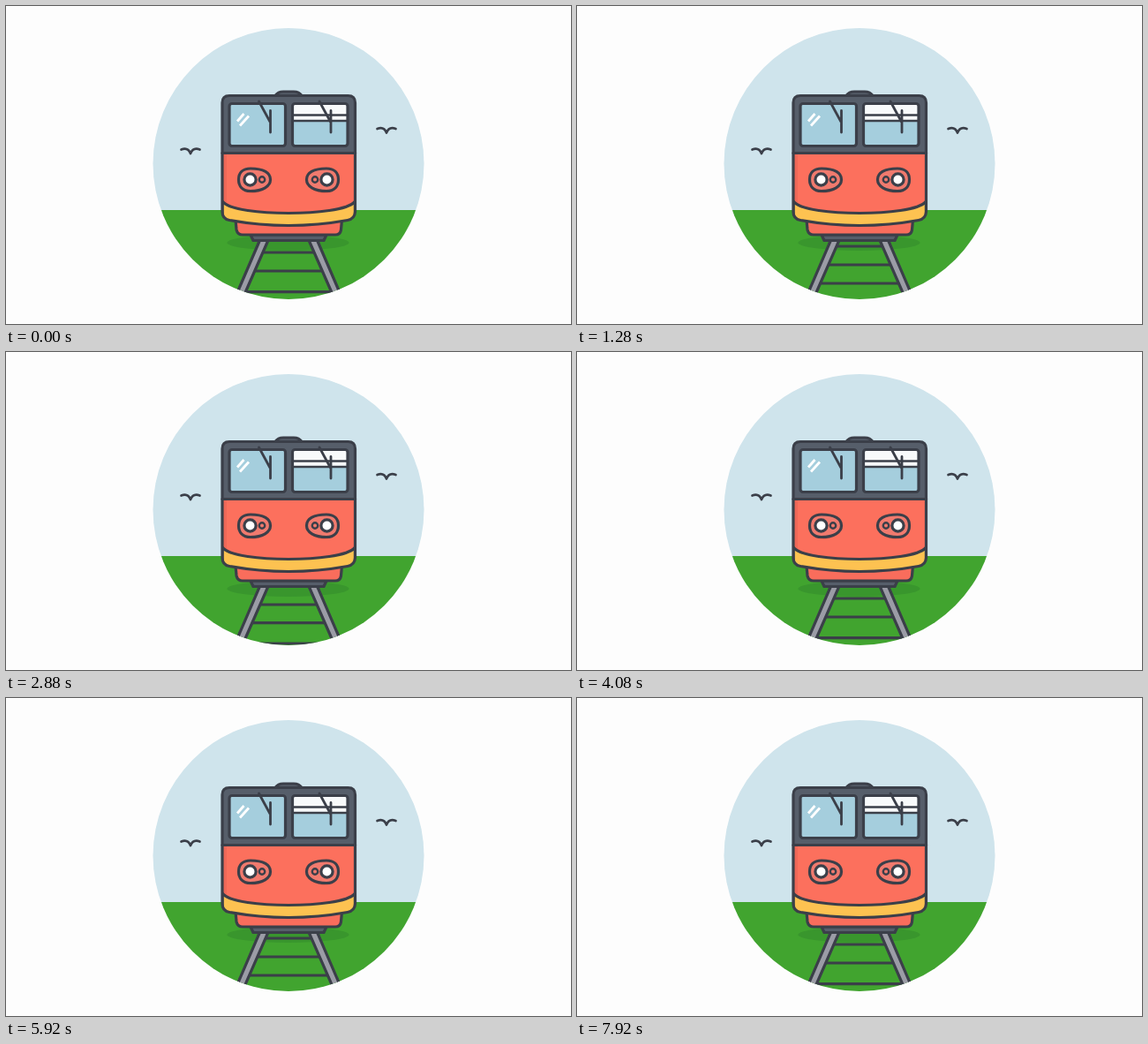
Animation, 640 px wide and 360 px high, one loop 8000 ms. Source, as an HTML page:

```html
<!DOCTYPE html>
<html>
<head>
<meta charset="utf-8">
<style>
  html, body { margin: 0; width: 100%; height: 100%; overflow: hidden; background: #fdfdfd; }
  svg { display: block; width: 100vw; height: 100vh; }
  .line { stroke: #3b3f49; stroke-width: 3.2; stroke-linecap: round; stroke-linejoin: round; }
  .open { fill: none; }
</style>
</head>
<body>
<svg viewBox="0 0 640 360">
  <defs>
    <clipPath id="disc"><circle cx="320" cy="178.5" r="153.5"/></clipPath>
    <clipPath id="shell"><path d="M245 167H395.500V233Q395 240 388 242Q320 254 252 242Q245 240 245 233Z"/></clipPath>
    <path id="rail" d="M288 264L260 329L269 329L297.500 264Z" fill="#9b9ca6" class="line"/>
    <g id="lamp">
      <path d="M265 203Q270 212 280 212Q294 210 299 202Z" fill="#e4604f"/>
      <path d="M277 184C292 184 299.500 189 299.500 196.500C299.500 204 291 209.500 277 209.500C268 209.500 263.500 204 263.500 196.500C263.500 189 268 184 277 184Z" fill="#f07a6e" class="line"/>
      <circle cx="276.500" cy="196.500" r="6.600" fill="#fff" class="line"/>
      <circle cx="290" cy="196.500" r="3.200" fill="#f07a6e" class="line" style="stroke-width:2.4"/>
    </g>
    <path id="bird" class="line open" style="stroke-width:2.7" d="M-10.500-1Q-3-4 0 3.500Q3-4 10.500-1"/>
    <path id="wiper" class="line open" d="M286.500 108L299 131M299.500 118.500V143" style="stroke-width:2.8"/>
  </defs>

  <g clip-path="url(#disc)">
    <path d="M160 20H480V231H160Z" fill="#cfe4ec"/>
    <path d="M160 231H480V340H160Z" fill="#41a42f"/>
    <ellipse cx="319.500" cy="268" rx="69" ry="9" fill="#39962d"/>
    <path id="ties" class="line open"/>
    <use href="#rail"/>
    <use href="#rail" transform="matrix(-1 0 0 1 640 0)"/>
  </g>

  <use href="#bird" x="209" y="163.500"/>
  <use href="#bird" x="431" y="140"/>

  <path d="M277 259H363L360 265.500H280Z" fill="#565e6a" class="line"/>
  <path d="M260 242H380.500L379.500 253Q379 259 373 259H268Q262 259 261 253Z" fill="#f96d5c" class="line"/>
  <path d="M305 101.500Q308 97 314 97H326Q332 97 335 101.500Z" fill="#565e6a" class="line"/>

  <g clip-path="url(#shell)">
    <path d="M245 166H396V252H245Z" fill="#fc705d"/>
    <path d="M245 166H250V252H245Z" fill="#ee6858"/>
    <path d="M245 221C252 231 290 234.500 320 234.500S388 231 395.500 221V256H245Z" fill="#fdc251" class="line"/>
  </g>
  <path d="M245 166.500V109.500Q245 101.500 253 101.500H387.500Q395.500 101.500 395.500 109.500V166.500Z" fill="#565e6a"/>
  <path d="M245 166.500H395.500" class="line open"/>
  <path d="M253 101.500H387.500Q395.500 101.500 395.500 109.500V233Q395 241 387 242.500Q320 254.500 253 242.500Q245 241 245 233V109.500Q245 101.500 253 101.500Z" class="line open"/>

  <rect x="253" y="110.500" width="63.500" height="48" rx="3" fill="#a5cedd" class="line"/>
  <rect x="324.500" y="110.500" width="62.500" height="48" rx="3" fill="#a5cedd"/>
  <path d="M326 111H386V130H326Z" fill="#f8fafb"/>
  <path d="M326 123.500H386M326 130H386" class="line open" style="stroke-width:2.6"/>
  <rect x="324.500" y="110.500" width="62.500" height="48" rx="3" class="line open"/>
  <path d="M262 130.500L269.500 122M265 135.500L275 124.500" fill="none" stroke="#fff" stroke-width="2.800"/>
  <use href="#wiper"/>
  <use href="#wiper" x="68.500"/>

  <use href="#lamp"/>
  <use href="#lamp" transform="matrix(-1 0 0 1 640 0)"/>
</svg>
<script>
  const LOOP = 8000, STEP = 80;
  const slots = [272, 279, 286, 293, 300, 306.7, 314, 323.7, 330];
  const ties = document.getElementById('ties');

  function draw(now) {
    const n = Math.floor(now % LOOP / STEP);
    // Ties roll forward one slot per step, with a short hold midway
    const moved = n + (n > 0 && n < 44 ? 1 : 0);
    const phase = (moved + 1) % 3;
    ties.setAttribute('d', slots
      .filter((_, i) => i % 3 === phase)
      .map(y => {
        const half = 25 + (y - 266) * 0.43;
        return `M${320 - half} ${y}H${320 + half}`;
      }).join(''));
  }

  const start = performance.now();
  function tick() {
    draw(performance.now() - start);
    requestAnimationFrame(tick);
  }
  tick();
</script>
</body>
</html>
```
